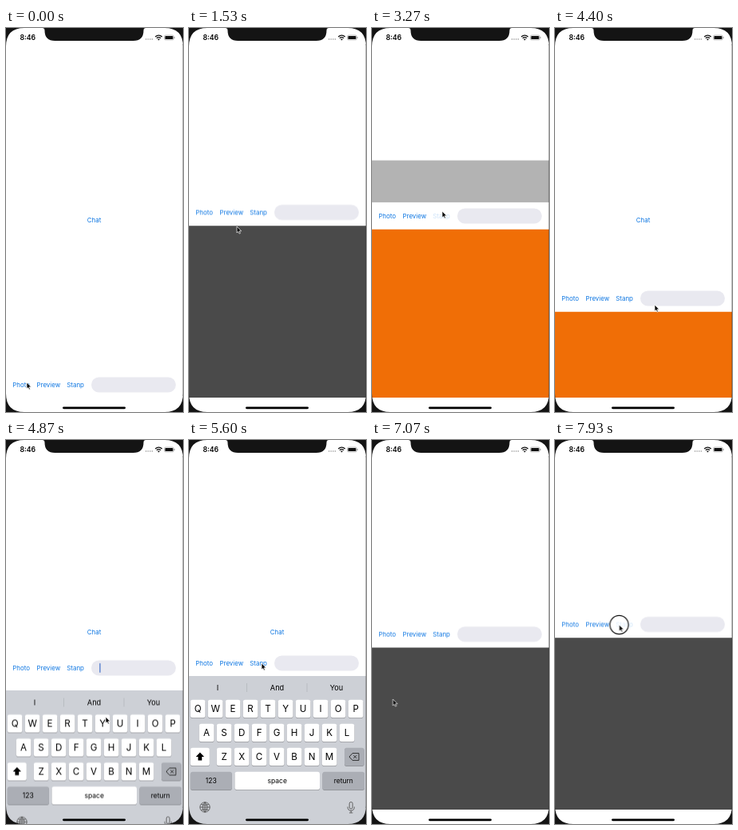
These frames come from a looping animation (222 px wide and 480 px high, 8 s). An HTML page:

```html
<!DOCTYPE html>
<html lang="en">
<head>
<meta charset="utf-8">
<title>Chat input bar</title>
<style>
  html, body { margin: 0; width: 100%; height: 100%; overflow: hidden; background: #fff; }
  svg { display: block; width: 222px; height: 480px; font-family: Inter, Roboto, sans-serif; }
  .link { fill: #0d76e2; font-size: 7.9px; }
  .letter { font-size: 11.6px; text-anchor: middle; }
  .word { font-size: 8.5px; text-anchor: middle; }
  .hint { font-size: 9.2px; text-anchor: middle; }

  .bar, .panel, .keys, .preview, .cursor {
    animation: 8s cubic-bezier(.38, .7, .125, 1) infinite;
  }
  .bar { animation-name: bar; }
  .panel { animation-name: panel; }
  .keys { animation-name: keys; }
  .preview { animation-name: preview; }
  .cursor { animation-name: cursor; animation-timing-function: ease-in-out; }
  .fill { animation: fill 8s step-end infinite; }
  .ring { animation: ring 8s step-end infinite; }
  .caret { animation: caret 8s step-end infinite; }
  .photo { animation: photo 8s linear infinite; }
  .look { animation: look 8s linear infinite; }
  .stamp { animation: stamp 8s linear infinite; }

  @keyframes bar {
    0%, 10.625% { transform: translateY(446px); }
    16.875%, 40.75% { transform: translateY(230.5px); }
    47%, 58.125% { transform: translateY(338px); }
    64.375%, 73.875% { transform: translateY(279px); }
    80.125%, 85.75% { transform: translateY(338px); }
    92%, 100% { transform: translateY(230.5px); }
  }
  @keyframes panel {
    0%, 10.625% { transform: translateY(462.5px); }
    16.875%, 40.75% { transform: translateY(247px); }
    47%, 85.75% { transform: translateY(354.5px); }
    92%, 100% { transform: translateY(247px); }
  }
  @keyframes fill {
    0% { fill: #4a4a4a; }
    40.75% { fill: #f06e06; }
    85.75%, 100% { fill: #4a4a4a; }
  }
  @keyframes keys {
    0%, 58.125% { transform: translateY(480px); }
    64.375%, 73.875% { transform: translateY(295px); }
    80.125%, 100% { transform: translateY(480px); }
  }
  @keyframes preview {
    0%, 27.5% { opacity: 0; }
    31%, 40.75% { opacity: 1; }
    47%, 100% { opacity: 0; }
  }
  @keyframes cursor {
    0%, 6.3% { transform: translate(26px, 443px); }
    6.63%, 15% { transform: translate(22.5px, 445px); }
    19.1% { transform: translate(60px, 248px); }
    22.6%, 32.3% { transform: translate(54px, 231px); }
    37%, 42.6% { transform: translate(88px, 229px); }
    52.4%, 62.5% { transform: translate(125px, 346px); }
    69.5%, 79.5% { transform: translate(91px, 279px); }
    82.6%, 87% { transform: translate(21.5px, 332px); }
    94%, 100% { transform: translate(80.5px, 231px); }
  }
  @keyframes ring {
    0% { opacity: 0; }
    6.63% { opacity: 1; }
    9.1% { opacity: 0; }
    24.4% { opacity: 1; }
    26.9% { opacity: 0; }
    37.5% { opacity: 1; }
    40.3% { opacity: 0; }
    52.5% { opacity: 1; }
    54.9% { opacity: 0; }
    70.6% { opacity: 1; }
    73.1% { opacity: 0; }
    82.7% { opacity: 1; }
    85% { opacity: 0; }
    96.6%, 100% { opacity: 1; }
  }
  @keyframes photo {
    0%, 6.63% { opacity: 1; }
    7.4%, 8.4% { opacity: .2; }
    9.1%, 82.7% { opacity: 1; }
    83.5%, 85.8% { opacity: .2; }
    88%, 100% { opacity: 1; }
  }
  @keyframes look {
    0%, 24.4% { opacity: 1; }
    25.1%, 26.9% { opacity: .2; }
    29%, 100% { opacity: 1; }
  }
  @keyframes stamp {
    0%, 37.5% { opacity: 1; }
    38.3%, 41% { opacity: .2; }
    43.5%, 96.6% { opacity: 1; }
    97.5%, 100% { opacity: .2; }
  }
  @keyframes caret {
    0% { opacity: 0; }
    58.8% { opacity: 1; }
    65.6% { opacity: 0; }
    71.9% { opacity: 1; }
    73.9%, 100% { opacity: 0; }
  }
</style>
</head>
<body>
<svg viewBox="0 0 222 480">
  <defs>
    <clipPath id="safe"><rect width="222" height="462"/></clipPath>
  </defs>
  <rect width="222" height="480" fill="#fff"/>
  <text class="link" x="110.5" y="242.8" text-anchor="middle">Chat</text>

  <g clip-path="url(#safe)">
    <g class="panel"><rect class="fill" width="222" height="300"/></g>
  </g>

  <g class="bar">
    <rect class="preview" y="-69.5" width="222" height="52.5" fill="#b0b0b0"/>
    <rect y="-17" width="222" height="33.5" fill="#fff"/>
    <text class="link photo" x="8.3" y="2.8">Photo</text>
    <text class="link look" x="38.5" y="2.8">Preview</text>
    <text class="link stamp" x="76.3" y="2.8">Stanp</text>
    <rect x="107" y="-9.5" width="106" height="19" rx="9.5" fill="#e9e9f0"/>
    <rect class="caret" x="117.3" y="-5.8" width="1.2" height="11.6" fill="#3f6fc8"/>
  </g>

  <g class="keys" id="keys">
    <rect width="222" height="186" fill="#cdd0d6"/>
    <path d="M72.5 9V20M148 9V20" stroke="#b3b6bc" stroke-width=".8"/>
    <text class="hint" x="36" y="18.3">I</text>
    <text class="hint" x="110.5" y="18.3">And</text>
    <text class="hint" x="185" y="18.3">You</text>
  </g>

  <g id="status">
    <text x="17.4" y="15.1" font-size="8.7" font-weight="600">8:46</text>
    <g fill="#8a8a8a">
      <circle cx="175.6" cy="14" r=".75"/><circle cx="178.2" cy="14" r=".75"/>
      <circle cx="180.8" cy="14" r=".75"/><circle cx="183.4" cy="14" r=".75"/>
    </g>
    <g fill="none" stroke="#111" stroke-width="1.3">
      <path d="M187.2 11Q191.5 7.2 195.8 11"/>
      <path d="M188.9 12.8Q191.5 10.6 194.1 12.8"/>
    </g>
    <path d="M190 13.9Q191.5 12.9 193 13.9L191.5 15.4Z" fill="#111"/>
    <rect x="198.6" y="9" width="11.8" height="6" rx="1.7" fill="none" stroke="#999" stroke-width=".6"/>
    <rect x="199.5" y="9.9" width="10" height="4.2" rx=".9" fill="#111"/>
    <path d="M211.3 11V13" stroke="#999" stroke-width=".8"/>
  </g>

  <rect x="71" y="473.4" width="79" height="2.8" rx="1.4" fill="#000"/>
  <path fill="#141414" fill-rule="evenodd" d="M0 0H222V480H0ZM23 0H199Q222 0 222 23V457Q222 480 199 480H23Q0 480 0 457V23Q0 0 23 0Z"/>
  <path fill="#141414" d="M45.5 0Q48.5 0 48.5 3.2Q48.5 16 61.5 16H159.5Q172.5 16 172.5 3.2Q172.5 0 175.5 0Z"/>
  <rect x="221.4" y="20" width=".6" height="440" fill="#141414" opacity=".4"/>

  <g class="cursor">
    <circle class="ring" r="11.6" fill="#fff" fill-opacity=".35" stroke="#111" stroke-width="1.2"/>
    <path d="M0 0V8L1.8 6.4L3 9.1L4.4 8.5L3.2 5.8H5.7Z" fill="#0a0a0a" stroke="#fff" stroke-width=".7" stroke-linejoin="round"/>
  </g>
</svg>

<script>
  const keys = document.getElementById('keys');

  function add(tag, attrs, text) {
    const el = document.createElementNS('http://www.w3.org/2000/svg', tag);
    for (const name in attrs) el.setAttribute(name, attrs[name]);
    if (text) el.textContent = text;
    keys.append(el);
  }

  function key(x, row, width, fill, label, type) {
    const y = 29.7 + row * 30;
    const box = { x, width, height: 22.6, rx: 2.7 };
    add('rect', { ...box, y: y + .7, fill: '#8b8d92' });
    add('rect', { ...box, y, fill });
    if (label) add('text', { class: type, x: x + width / 2, y: y + (type === 'letter' ? 15.6 : 14.2) }, label);
  }

  const white = '#fff', gray = '#abaeb5';
  [['QWERTYUIOP', 1.8], ['ASDFGHJKL', 12.8], ['ZXCVBNM', 34.8]].forEach(([letters, left], row) =>
    [...letters].forEach((c, i) => key(left + i * 22, row, 18.6, white, c, 'letter')));

  key(1.8, 2, 24, white);
  key(195, 2, 24.6, gray);
  key(1.8, 3, 52, gray, '123', 'word');
  key(57.5, 3, 106.5, white, 'space', 'word');
  key(167.5, 3, 52.5, gray, 'return', 'word');

  const line = { fill: 'none', stroke: '#222', 'stroke-width': .9 };
  add('path', { d: 'M13.8 95.5L19 101H16.2V105.6H11.4V101H8.6Z', fill: '#000' });
  add('path', { ...line, d: 'M205 96.6H213V105.4H205L201 101ZM206.3 99L210.3 103M210.3 99L206.3 103' });
  add('path', { ...line, stroke: '#555', d: 'M13.8 164a6.2 6.2 0 1 0 12.4 0a6.2 6.2 0 1 0 -12.4 0H26.2M20 157.8V170.2M20 157.8Q14 164 20 170.2Q26 164 20 157.8M15.2 160.5Q20 162.4 24.8 160.5M15.2 167.5Q20 165.6 24.8 167.5' });
  add('rect', { ...line, stroke: '#555', x: 201.2, y: 157.5, width: 4, height: 8.6, rx: 2 });
  add('path', { ...line, stroke: '#555', d: 'M199 163.5Q199 168.3 203.2 168.3Q207.4 168.3 207.4 163.5M203.2 168.3V171M201 171H205.4' });
</script>
</body>
</html>
```
